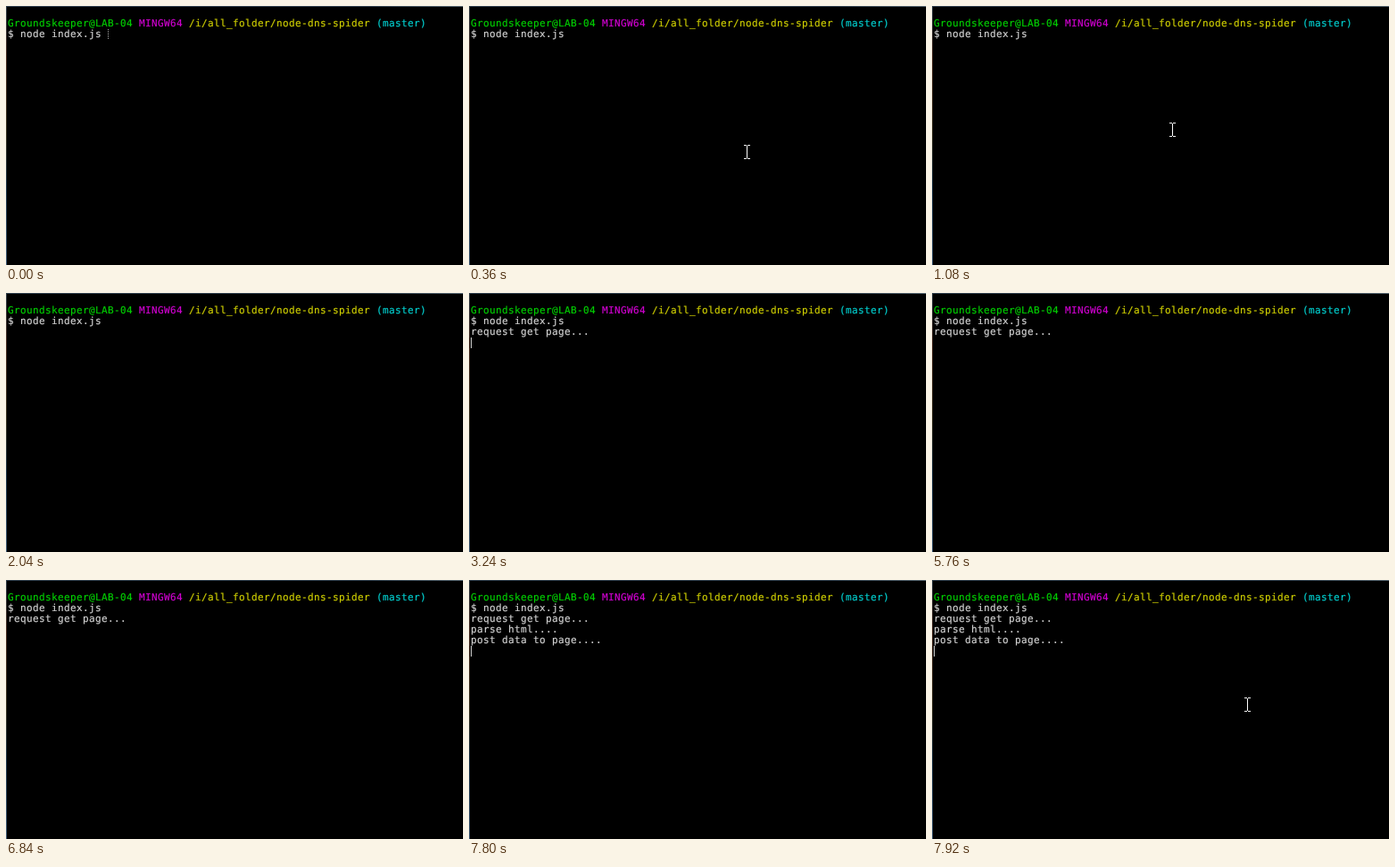
An HTML page for the animation above (8 s loop, 512 px wide and 291 px high).

```html
<!DOCTYPE html>
<html lang="en">
<head>
<meta charset="utf-8">
<title>Terminal session</title>
<style>
  html, body { margin: 0; width: 100%; height: 100%; overflow: hidden; background: #000; }
  svg { display: block; width: 512px; height: 291px; }
  text {
    font: 11px "DejaVu Sans Mono", monospace;
    letter-spacing: .378px;
    text-rendering: geometricPrecision;
    fill: currentColor;
    stroke: currentColor;
    stroke-width: .2px;
    color: #d0d0d0;
  }
  .user { color: #00cc00; }
  .host { color: #cc00cc; }
  .path { color: #cccc00; }
  .git { color: #00cccc; }
  .caret, .pointer { shape-rendering: crispEdges; }
  .caret { fill: #cecece; }
  .pointer { fill: #fff; }

  .request, .parse, .post, .caret, .pointer, .ghost {
    animation: 8s step-end infinite;
  }
  .request { animation-name: request; }
  .parse { animation-name: parse; }
  .post { animation-name: post; }
  .caret { animation-name: row, blink; }
  .pointer { animation-name: move, show; }
  .ghost { animation-name: ghost; }

  @keyframes request { 0% { opacity: 0; } 27%, 100% { opacity: 1; } }
  @keyframes parse { 0% { opacity: 0; } 96%, 100% { opacity: 1; } }
  @keyframes post { 0% { opacity: 0; } 97.5%, 100% { opacity: 1; } }
  @keyframes ghost { 0% { opacity: 1; } 1.5%, 100% { opacity: 0; } }

  @keyframes row {
    0% { transform: translate(114px, 26px); }
    19.5% { transform: translate(2px, 38px); }
    27% { transform: translate(2px, 50px); }
    96% { transform: translate(2px, 62px); }
    97.5%, 100% { transform: translate(2px, 74px); }
  }
  @keyframes blink {
    0%, 13.5%, 25.5%, 33%, 46.5%, 60%, 72%, 85.5% { opacity: 0; }
    6%, 19.5%, 27%, 40.5%, 52.5%, 66%, 78%, 91.5%, 100% { opacity: 1; }
  }
  @keyframes move {
    0%, 1.5% { transform: translate(508px, 266px); }
    3% { transform: translate(400px, 206px); }
    4.5% { transform: translate(311px, 156px); }
    6% { transform: translate(269px, 131px); }
    99%, 100% { transform: translate(353px, 132px); }
  }
  @keyframes show {
    0%, 18% { opacity: 0; }
    1.5%, 99%, 100% { opacity: 1; }
  }
</style>
</head>
<body>
<svg viewBox="0 0 512 291">
  <defs>
    <linearGradient id="side" x2="0" y2="1">
      <stop offset="0" stop-color="#34424c"/>
      <stop offset=".2" stop-color="#4e3226"/>
      <stop offset=".5" stop-color="#3e3826"/>
      <stop offset=".7" stop-color="#20384c"/>
      <stop offset="1" stop-color="#44607a"/>
    </linearGradient>
    <linearGradient id="top">
      <stop offset=".8" stop-color="#2c3c4a"/>
      <stop offset="1" stop-color="#566670"/>
    </linearGradient>
  </defs>
  <rect width="512" height="291"/>
  <rect width="512" height="1" fill="url(#top)"/>
  <rect width="1" height="291" fill="url(#side)"/>

  <text x="2" y="23"><tspan class="user">Groundskeeper@LAB-04</tspan> <tspan class="host">MINGW64</tspan> <tspan class="path">/i/all_folder/node-dns-spider</tspan> <tspan class="git">(master)</tspan></text>
  <text x="2" y="35">$ node index.js</text>
  <text class="request" x="2" y="47">request get page...</text>
  <text class="parse" x="2" y="59">parse html....</text>
  <text class="post" x="2" y="71">post data to page....</text>

  <path class="ghost" d="M114.5 26v12" stroke="#aaa" stroke-dasharray="1"/>
  <rect class="caret" width="1" height="12"/>
  <path class="pointer" d="M-3 0h3v1h1v-1h3v1h-3v14h3v1h-3v-1h-1v1h-3v-1h3v-14h-3z"/>
</svg>
</body>
</html>
```
